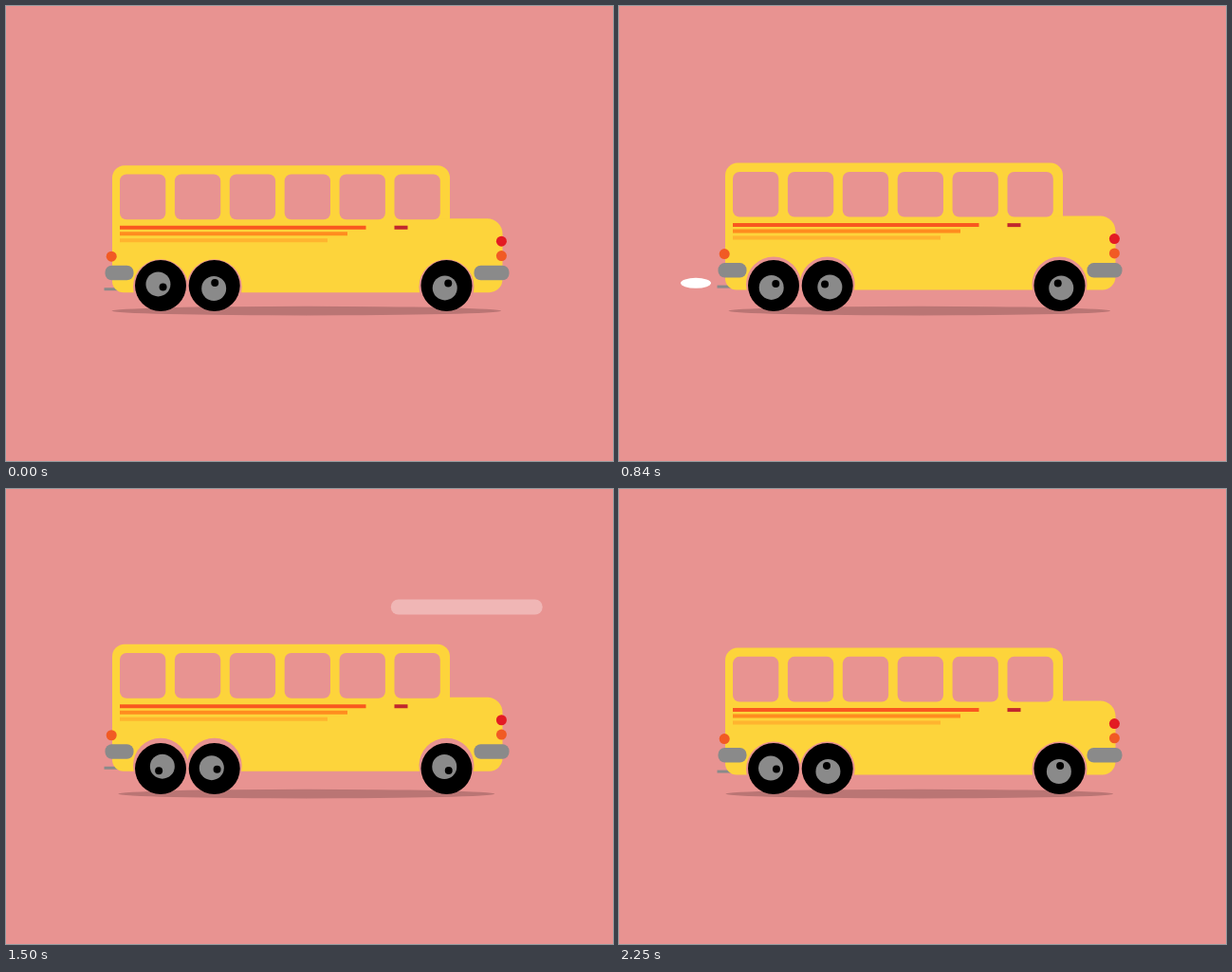
An HTML page with a canvas that plays this animation: 640 by 480 pixels, repeating every 2.28 s.

```html
<!DOCTYPE html>
<html>
<head>
<meta charset="utf-8">
<style>
  html, body { margin: 0; width: 100%; height: 100%; overflow: hidden; background: #e89391; }
  canvas { display: block; }
</style>
</head>
<body>
<canvas id="stage" width="640" height="480"></canvas>
<script>
const ctx = document.getElementById('stage').getContext('2d');
const LOOP = 2280, STEP = 30, TAU = Math.PI * 2;
const PINK = '#e89391', YELLOW = '#fdd43b', GREY = '#8a8a8a';

function box(x, y, w, h, r, color) {
  ctx.fillStyle = color;
  ctx.beginPath();
  ctx.roundRect(x, y, w, h, r);
  ctx.fill();
}

function oval(x, y, rx, ry, color) {
  ctx.fillStyle = color;
  ctx.beginPath();
  ctx.ellipse(x, y, rx, ry, 0, 0, TAU);
  ctx.fill();
}

const disc = (x, y, r, color) => oval(x, y, r, r, color);

// Hub and bolt sit on opposite sides of the axle.
function wheel(x, degrees) {
  const a = degrees * TAU / 360, dx = 3 * Math.cos(a), dy = 3 * Math.sin(a);
  disc(x, 295, 27, '#000');
  disc(x - dx, 295 - dy, 13, GREY);
  disc(x + dx, 295 + dy, 4, '#000');
}

function body() {
  box(103.5, 296, 16, 3, 0, GREY);
  box(112, 167, 356, 134, [13, 13, 0, 12], YELLOW);
  box(440, 223, 83.5, 78, [0, 16, 14, 0], YELLOW);
  for (let i = 0; i < 6; i++) box(120 + i * 57.9, 176.3, 48.3, 47.7, 7, PINK);
  box(120, 230.5, 259.5, 4, 0, '#f9581f');
  box(120, 237, 240, 4, 0, '#ff8c1f');
  box(120, 244, 219, 4, 0, '#ffb42f');
  box(409.5, 230.5, 14, 4, 0, '#c1272d');
  for (const x of [163, 219.7, 464.5]) disc(x, 295, 29, PINK);
  disc(111.2, 263, 5.5, '#f15a24');
  disc(522.4, 247, 5.5, '#e31b23');
  disc(522.4, 262.3, 5.5, '#f15a24');
  box(104.5, 272.5, 30, 15.5, 7, GREY);
  box(493.5, 272.5, 37, 15.5, 7, GREY);
}

function cloud(time) {
  const x = 613.5 - 41.55 * ((time < 1230 ? time : time - 1230) / STEP - 4);
  box(x, 116.5, 160, 16, 8, 'rgba(255,255,255,.32)');
}

function exhaust(time) {
  const phase = time % 750;
  [[81, 292.3, 16, 5.5, 1], [51.5, 279.8, 20, 6.5, .5], [27, 264, 22.5, 8, .2]]
    .forEach(([x, y, rx, ry, alpha], i) => {
      const start = 60 + 60 * i;
      if (phase >= start && phase < start + 360) oval(x, y, rx, ry, `rgba(255,255,255,${alpha})`);
    });
}

function draw(now) {
  const time = Math.floor(now % LOOP / STEP) * STEP;
  const tick = Math.max(1, time / STEP);
  const bounce = Math.cos(TAU * (tick - .75) * 13 / 75);

  ctx.fillStyle = PINK;
  ctx.fillRect(0, 0, 640, 480);
  cloud(time);
  exhaust(time);

  ctx.save();
  ctx.translate(0, 2.3 * bounce - 1);
  body();
  ctx.restore();

  oval(316.8, 321.6, 202 + 3.5 * bounce, 4.8, '#ba7574');
  wheel(163, 8 + 24 * tick);
  wheel(219.7, 256 + 24 * tick);
  wheel(464.5, 282 + 24 * tick);
}

const begin = performance.now();
function play() {
  draw(performance.now() - begin);
  requestAnimationFrame(play);
}
play();
</script>
</body>
</html>
```
